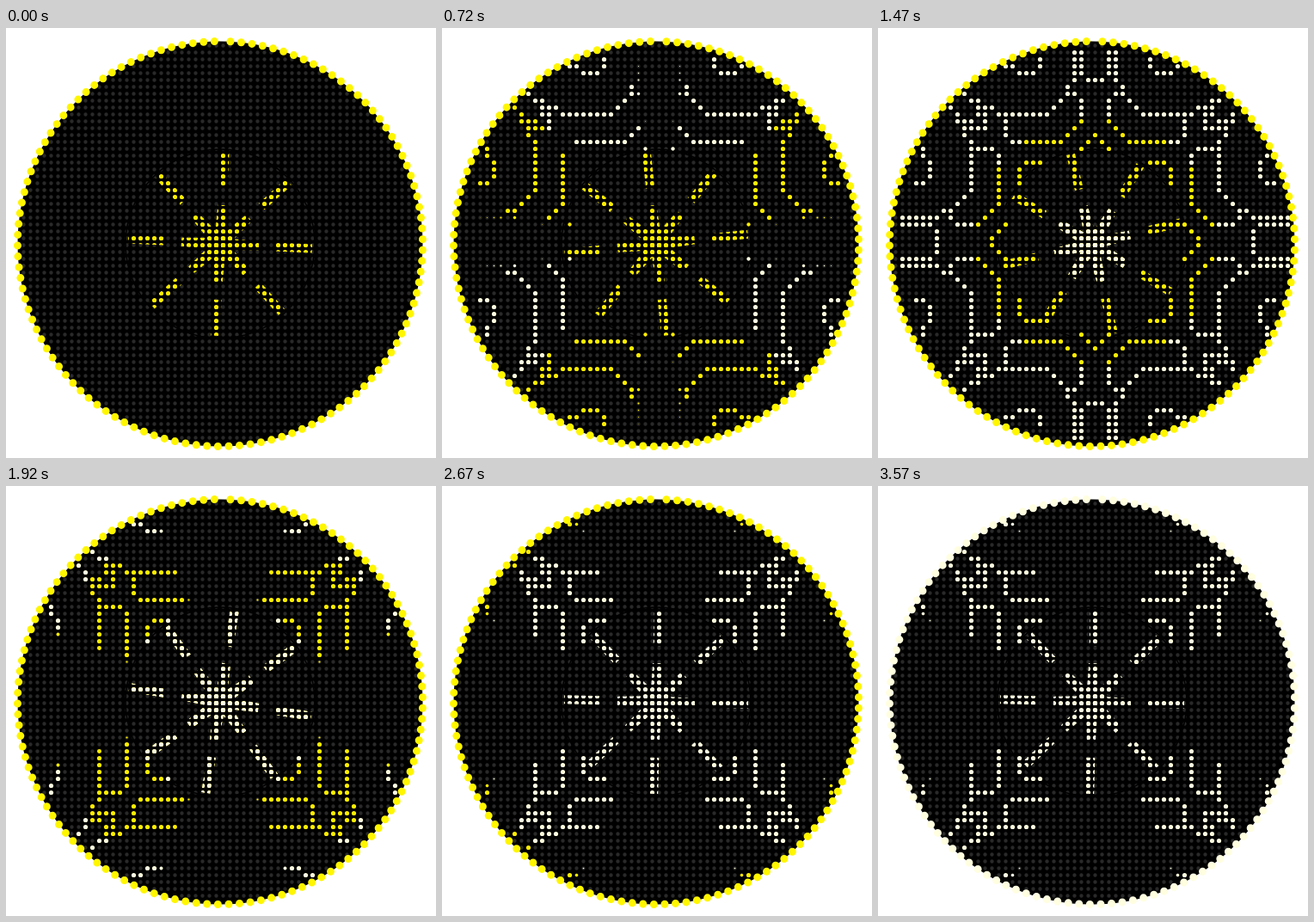
An HTML page with a canvas for the animation above (3.6 s loop, 500 px wide and 500 px high).

```html
<!DOCTYPE html>
<html>
<head>
<meta charset="utf-8">
<style>
  html, body { margin: 0; width: 100%; height: 100%; overflow: hidden; background: #fff; }
  canvas { display: block; width: 500px; height: 500px; }
</style>
</head>
<body>
<canvas id="c" width="500" height="500"></canvas>
<script>
const ctx = document.getElementById('c').getContext('2d');
const CX = 249, CY = 251, STEP = 8, LOOP = 3600, TAU = Math.PI * 2;
const MID_X = 252.5, MID_Y = 248.5;
const YELLOW = '#ffee00', CREAM = '#fffee0', RIM = '#fff600';
const rad = deg => deg * Math.PI / 180;

// One octant of the figure as polylines on the lamp grid, counted from the middle.
const lines = {
  leaf: [[13, 18, 7, 18, 4, 21, 3, 21, 2, 20, 2, 17, 5, 14, 12, 14]],
  side: [[13, 17, 13, 15]],
  stalk: [[3, 28, 3, 23, 4, 22], [2, 28, 2, 24, 1, 23, 0, 23]],
  arc: [[13, 25, 12, 25, 11, 24, 9, 24, 8, 25, 8, 26]],
  stair: [[14, 18, 15, 19, 16, 19, 16, 16], [17, 18, 17, 20, 18, 20, 19, 21]],
  arrow: [[10, 11, 8, 11]],
  tip: [[0, 15, 1, 14, 2, 13]]
};

function walk(p, visit) {
  for (let i = 0; i + 3 < p.length; i += 2) {
    const dx = p[i + 2] - p[i], dy = p[i + 3] - p[i + 1];
    const n = Math.max(Math.abs(dx), Math.abs(dy));
    for (let k = 0; k <= n; k++) visit(p[i] + dx * k / n, p[i + 1] + dy * k / n);
  }
}

// The horizontal axis runs between two lamp rows, the vertical one along a column.
const lamps = new Map();
for (const group in lines) for (const line of lines[group]) walk(line, (a, b) => {
  for (const [u, v] of [[a, b], [b, a]])
    for (const sx of [-1, 1]) for (const sy of [-1, 1]) {
      const dx = u * sx * STEP, dy = (v + 0.5) * sy * STEP, r = Math.hypot(dx, dy);
      if (Math.hypot(MID_X + dx - CX, MID_Y + dy - CY) > 230) continue;
      lamps.set(dx + ',' + dy, {
        dx, dy, r, group,
        fromDiagonal: 45 - Math.atan2(Math.min(u, v), Math.max(u, v)) * 180 / Math.PI
      });
    }
});

function addDot(path, x, y, r) {
  path.moveTo(x + r, y);
  path.arc(x, y, r, 0, TAU);
}

const dim = new Path2D(), holes = new Path2D(), rim = new Path2D();
for (let x = 4.5; x < 500; x += STEP) for (let y = 4.5; y < 500; y += STEP) {
  const r = Math.hypot(x - CX, y - CY);
  if (r < 231) addDot(dim, x, y, 2.2);
  if (r < 120) addDot(holes, x, y, 2.6);
}
for (let i = 0; i < 117; i++) {
  const a = rad(2.9 + i * 3.0645 - 90);
  addDot(rim, CX + 235.5 * Math.cos(a), CY + 235.5 * Math.sin(a), 4.5);
}

const rays = new Path2D();
function bar(from, to, w0, w1) {
  rays.moveTo(-w0, -from);
  rays.lineTo(-w1, -to);
  rays.lineTo(w1, -to);
  rays.lineTo(w0, -from);
  rays.closePath();
}
bar(0, 45, 7, 5);
bar(65, 107, 5, 5);

function drawRays(t, color, limit) {
  ctx.save();
  ctx.clip(holes);
  ctx.translate(CX, CY);
  ctx.beginPath();
  ctx.arc(0, 0, limit, 0, TAU);
  ctx.clip();
  ctx.rotate(rad(3 + t * 0.05));
  ctx.fillStyle = color;
  for (let i = 0; i < 8; i++) {
    ctx.fill(rays);
    ctx.rotate(TAU / 8);
  }
  ctx.restore();
}

function isOn(group, t) {
  if (t < 700) return group === 'leaf' || group === 'side' || group === 'stalk';
  if (t < 1450) return group !== 'arrow' && group !== 'side';
  return true;
}

function isCream(l, t, front) {
  if (l.r < front) return true;
  if (l.r < (t - 470) * 0.143) return false;
  if (t < 720) return l.dy > 8 || (l.r > 185 && Math.abs(l.dy) < 32);
  if (t < 1400) return Math.abs(l.dy) > Math.abs(l.dx) ? l.dy < 0 : l.dy > 0;
  return true;
}

function draw(t) {
  const flash = t >= 3300 || t < 300;
  const pale = flash && Math.floor(t / 150) % 2 === 1;
  const front = flash ? (pale ? 300 : 0) : Math.max(0, (t - 1115) * 0.143);

  ctx.clearRect(0, 0, 500, 500);
  ctx.fillStyle = '#000';
  ctx.beginPath();
  ctx.arc(CX, CY, 235.5, 0, TAU);
  ctx.fill();
  ctx.fillStyle = '#292929';
  ctx.fill(dim);
  ctx.strokeStyle = '#000';
  ctx.lineWidth = 1.5;
  ctx.beginPath();
  ctx.arc(CX, CY, 110, 0, TAU);
  ctx.stroke();

  if (!flash || pale) {
    const extra = t > 700 && t < 1450 ? 6 : 0;
    const open = 21 + extra + 34 * Math.sin(Math.PI * t / 900) ** 2;
    for (const l of lamps.values()) {
      const edge = (open - l.fromDiagonal) / 3;
      if (edge <= 0 || !isOn(l.group, t)) continue;
      ctx.fillStyle = isCream(l, t, front) ? CREAM : YELLOW;
      ctx.beginPath();
      ctx.arc(MID_X + l.dx, MID_Y + l.dy, 2.6 * Math.min(1, edge), 0, TAU);
      ctx.fill();
    }
  }

  if (front < 120) drawRays(t, YELLOW, 120);
  if (front > 0) drawRays(t, CREAM, front);
  ctx.fillStyle = pale ? CREAM : RIM;
  ctx.fill(rim);
}

const start = performance.now();
function tick() {
  const t = (performance.now() - start) % LOOP;
  draw(Math.floor(t / 30) * 30);
  requestAnimationFrame(tick);
}
tick();
</script>
</body>
</html>
```
